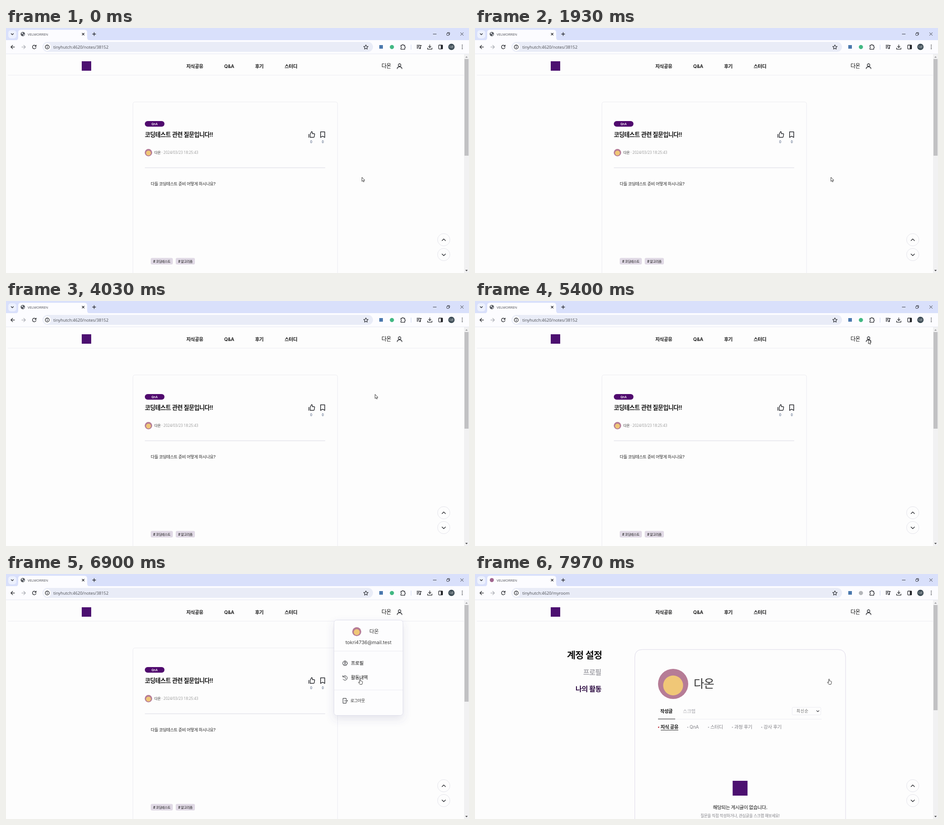
Recreate the animation shown at these times as an HTML page. Size 1027x545 px, loop 8000 ms.

```html
<!DOCTYPE html>
<html lang="ko">
<head>
<meta charset="utf-8">
<title>Board to activity page</title>
<style>
  html, body { margin: 0; width: 100%; height: 100%; overflow: hidden; background: #fdfdfd; }
  svg { display: block; width: 100vw; height: 100vh; }
  text { font-family: Inter, "Noto Sans CJK KR", "Noto Sans CJK", sans-serif; letter-spacing: -.04em; fill: #111; }
  .ui { font-family: "Open Sans", "Noto Sans", sans-serif; letter-spacing: 0; fill: #4a4c52; }
  .latin { letter-spacing: 0; }
  .mid { text-anchor: middle; }
  .medium { font-weight: 500; }
  .bold { font-weight: 600; }
  .gray { fill: #808086; }
  .pale { fill: #a8a8ae; }
  .line { fill: none; stroke: #24262b; stroke-width: 1.3; stroke-linejoin: round; stroke-linecap: round; }
  .edge { fill: none; stroke: #ebebf1; }
  .brand { fill: #4c1070; }
</style>
</head>
<body>
<svg viewBox="0 0 1027 545">
  <defs>
    <filter id="shadow" x="-30%" y="-30%" width="160%" height="160%">
      <feDropShadow dx="0" dy="8" stdDeviation="9" flood-color="#50508c" flood-opacity=".14"/>
    </filter>
    <g id="avatar">
      <circle r="10" fill="#b67c96"/>
      <circle r="6.6" cy="1" fill="#f0c777"/>
    </g>
    <g id="person" class="line">
      <circle cy="-2.6" r="2.9"/>
      <path d="M-5.3 5.6C-5 -.2 5 -.2 5.3 5.6"/>
    </g>
  </defs>

  <!-- Browser window -->
  <rect width="1027" height="545" fill="#fdfdfd"/>
  <rect width="1027" height="30" fill="#d9e0fb"/>
  <rect x="5" y="5" width="18" height="18" rx="6" fill="#edf1fe"/>
  <path class="line" d="M11.5 12.5l2.5 2.5 2.5-2.5"/>
  <path d="M20 28q7 0 7-7V10q0-6 6-6H174q6 0 6 6V21q0 7 7 7z" fill="#fcfcff"/>
  <rect y="27" width="1027" height="30.5" fill="#fcfcff"/>
  <path d="M0 57.5H1027" stroke="#e6e8f2"/>
  <g class="board">
    <circle cx="37.3" cy="13.5" r="4.8" fill="#55585e"/>
    <path d="M34 11l3-1 1 2-2 2zM38 15l3-2-.5 3-2 1z" fill="#e8eaf0"/>
  </g>
  <circle class="mypage" cx="37.3" cy="13.5" r="4.5" fill="#a0658f"/>
  <text class="ui" x="48" y="17.2" font-size="7.7">VELMORREN</text>
  <path class="line" d="M169 11.5l4.4 4.4m0-4.4l-4.4 4.4M192 13.5h7m-3.5-3.5v7"/>
  <g class="line" style="stroke-width:.9">
    <path d="M947.5 13.5h7M1008.3 10.3l6.2 6.2m0-6.2l-6.2 6.2M979.4 11.4v-1.3h4.6v4.6h-1.3"/>
    <rect x="977.7" y="11.5" width="5" height="5" rx="1"/>
  </g>

  <rect x="81" y="31" width="733" height="22" rx="11" fill="#e9ecf7"/>
  <circle cx="91.5" cy="42.3" r="8.5" fill="#fdfdff"/>
  <g class="line">
    <path d="M19 42.3h-8m3.7-3.8l-3.8 3.8 3.8 3.8"/>
    <path d="M35 42.3h8m-3.7-3.8l3.8 3.8-3.8 3.8" stroke="#a9abb2"/>
    <path d="M66.3 40.4a4 4 0 1 0 .3 3M66.8 38v2.8h-2.8"/>
    <circle cx="91.5" cy="42.3" r="4.3"/>
    <path d="M91.5 42v2.3m0-4.2v.1"/>
    <path d="M798.3 37.5l1.5 3.2 3.5.4-2.6 2.4.7 3.5-3.1-1.8-3.1 1.8.7-3.5-2.6-2.4 3.5-.4z" style="stroke-width:1.1"/>
    <path d="M876 38.5h2.6a1.6 1.6 0 0 1 3.2 0h2.7v3a1.6 1.6 0 0 1 0 3.1v2.8H876v-2.9a1.6 1.6 0 0 0 0-3z"/>
    <path d="M911.5 38.5h7m-7 3h5m-5 3h3M919.5 45v-6h2"/>
    <circle cx="918.2" cy="45" r="1.2"/>
    <path d="M940 37.5v6m-2.7-2.6l2.7 2.7 2.7-2.7M935.2 44.3v2.8h9.6v-2.8"/>
    <rect x="959.8" y="38" width="8.6" height="8.6" rx="1"/>
  </g>
  <rect x="964.5" y="38" width="4" height="8.6" fill="#24262b"/>
  <rect x="828" y="38" width="8" height="8" fill="#4a78ad"/>
  <circle id="extension" cx="856" cy="42.3" r="4.6"/>
  <path d="M898.5 37v11" stroke="#cdd5ee"/>
  <circle cx="988" cy="42" r="7" fill="#3b4a54"/>
  <text class="mid" x="988" y="44" font-size="5.5" style="fill:#fff">다온</text>
  <g fill="#24262b"><circle cx="1012" cy="38.3" r="1"/><circle cx="1012" cy="42.2" r="1"/><circle cx="1012" cy="46.1" r="1"/></g>
  <text id="address" class="ui" x="105" y="45.7" font-size="9.3"></text>

  <!-- Site header -->
  <rect class="brand" x="168" y="74" width="21" height="21"/>
  <g class="bold" font-size="10.6">
    <text x="400" y="88.7">지식공유</text>
    <text class="latin" x="484" y="88.7" font-size="10.3">Q&amp;A</text>
    <text x="552.5" y="88.7">후기</text>
    <text x="618" y="88.7">스터디</text>
  </g>
  <text class="medium" x="833" y="89" font-size="12">다온</text>
  <use href="#person" x="873" y="85"/>
  <path class="edge" d="M4 105H1016"/>

  <!-- Post -->
  <g class="board">
    <path class="edge" d="M281.5 545V169.5q0-5 5-5H730.5q5 0 5 5V545"/>
    <rect x="308" y="207" width="43.5" height="12.5" rx="6.2" fill="#500a6e"/>
    <text class="mid bold latin" x="329.5" y="215.5" font-size="6.5" style="fill:#fff">QnA</text>
    <text class="bold" x="308" y="242" font-size="13.1">코딩테스트 관련 질문입니다!!</text>
    <path class="line" style="stroke-width:1.9" transform="translate(669 228.3) scale(.75)"
      d="M7.5 11v9m0-9l4-8c1.6 0 2.5 1 2.5 2.5V9H19c1.3 0 2 1 1.8 2.2l-1.3 7A2 2 0 0 1 17.5 20h-10M3.5 11v9"/>
    <path class="line" style="stroke-width:1.5" d="M697.8 231h9.2v12.4l-4.6-2.7-4.6 2.7z"/>
    <text class="mid latin" x="677" y="256" font-size="7" style="fill:#233a63">0</text>
    <text class="mid latin" x="702.6" y="256" font-size="7" style="fill:#233a63">0</text>
    <use href="#avatar" transform="translate(316 277.3) scale(.82)"/>
    <text x="329" y="280.2" font-size="8" style="fill:#333">다온</text>
    <text class="ui" x="345" y="280.3" font-size="8.1" style="fill:#999">· 2024/03/23 18:25:43</text>
    <path d="M308 310.8H708" stroke="#e0dfe8" stroke-width="1.3"/>
    <text x="321" y="350.3" font-size="9.25" style="fill:#222">다들 코딩테스트 준비 어떻게 하시나요?</text>
    <g fill="#e0d9e5">
      <rect x="321" y="511.5" width="49" height="14.5" rx="3"/>
      <rect x="376.5" y="511.5" width="42.5" height="14.5" rx="3"/>
    </g>
    <g class="medium" font-size="7.3">
      <text x="326.5" y="521.5"># 코딩테스트</text>
      <text x="382" y="521.5"># 알고리즘</text>
    </g>
  </g>

  <!-- Activity page -->
  <g class="mypage">
    <g class="bold">
      <text x="204" y="188.3" font-size="20.8">계정 설정</text>
      <text class="pale" x="240" y="223.5" font-size="15.1">프로필</text>
      <text x="223" y="261" font-size="15.3" style="fill:#2d0b42">나의 활동</text>
    </g>
    <path d="M354.5 545V185q0-17 17-17H805q17 0 17 17V545" fill="none" stroke="#dcd8e8"/>
    <use href="#avatar" transform="translate(439.5 244.5) scale(3.35)"/>
    <text x="485" y="253" font-size="25.5" style="fill:#333">다온</text>
    <text class="bold" x="411" y="309.3" font-size="10.3">작성글</text>
    <text class="pale" x="461" y="309.3" font-size="10.5">스크랩</text>
    <path class="edge" d="M406 323H769"/>
    <path d="M406 322.5H444" stroke="#222" stroke-width="1.2"/>
    <rect class="edge" x="703.5" y="296.5" width="63.5" height="17" rx="2"/>
    <text x="713" y="308.3" font-size="9" style="fill:#666;letter-spacing:.08em">최신순</text>
    <path class="line" style="stroke-width:1.1" d="M757.8 303.8l2.6 2.6 2.6-2.6"/>
    <circle cx="407.3" cy="341" r="1.4" fill="#c22b3a"/>
    <g fill="#b5b5bb"><circle cx="472" cy="341" r="1.3"/><circle cx="518" cy="341" r="1.3"/><circle cx="571" cy="341" r="1.3"/><circle cx="636" cy="341" r="1.3"/></g>
    <path d="M412 347.3H451" stroke="#222"/>
    <g font-size="10.6">
      <text class="bold" x="411.5" y="344">지식 공유</text>
      <text class="gray latin" x="476" y="344" font-size="10">QnA</text>
      <text class="gray" x="522" y="344">스터디</text>
      <text class="gray" x="575" y="344">과정 후기</text>
      <text class="gray" x="640" y="344">강사 후기</text>
    </g>
    <rect class="brand" x="571.5" y="460" width="33" height="33"/>
    <text class="mid medium" x="588" y="523.2" font-size="10.7">해당되는 게시글이 없습니다.</text>
    <text class="mid gray" x="588" y="540.8" font-size="8.7">질문을 직접 작성하거나, 관심글을 스크랩 해보세요!</text>
  </g>

  <!-- Scroll controls -->
  <g fill="#fdfdfd" stroke="#e3e3ea"><circle cx="971" cy="471" r="13.7"/><circle cx="971" cy="504" r="13.7"/></g>
  <path class="line" d="M967.2 473l3.8-3.8 3.8 3.8M967.2 502.7l3.8 3.8 3.8-3.8"/>
  <rect x="1016" y="58" width="11" height="487" fill="#f1f1f2"/>
  <rect id="thumb" x="1017" y="69" width="9" fill="#c1c1c3"/>
  <path d="M1018.8 66l2.7-3.2 2.7 3.2z" fill="#a0a0a2"/>
  <path d="M1018.8 538l2.7 3.2 2.7-3.2z" fill="#505052"/>

  <!-- Account menu -->
  <g id="menu">
    <rect x="727.5" y="102.5" width="153" height="212" rx="6" fill="#fdfdfe" stroke="#dedeea" filter="url(#shadow)"/>
    <use href="#avatar" x="778" y="128.3"/>
    <text x="806" y="132.3" font-size="11.6" style="fill:#333">다온</text>
    <text class="mid latin" x="804" y="156.3" font-size="10.8" style="fill:#444">tokri4736@mail.test</text>
    <path class="edge" d="M728 171.5H880M728 258H880"/>
    <g class="line" style="stroke-width:1">
      <circle cx="752" cy="198.5" r="5.2"/><circle cx="752" cy="197" r="1.9"/>
      <path d="M748.6 202.3q3.4-3.4 6.8 0"/>
      <path d="M747.6 228.7a5 5 0 1 1 0 5.2M747 226v3h3M752 228.5v3l2.2 1.3"/>
      <path d="M754.5 279.5v-3h-7v11h7v-3M751 282h6.5m-2-2l2 2-2 2"/>
    </g>
    <text class="medium" x="765" y="202" font-size="10.6">프로필</text>
    <text class="medium" x="765" y="234.2" font-size="10.6">활동내역</text>
    <text x="764" y="284.7" font-size="9.1" style="fill:#333">로그아웃</text>
  </g>

  <g id="pointer" fill="#fff" stroke="#222" stroke-width=".9" stroke-linejoin="round">
    <path id="arrow" d="M0 0V9.2L2.1 7.3 3.5 10.4 5 9.7 3.7 6.7H6.4z"/>
    <path id="hand" d="M-1 6V1a.9.9 0 0 1 1.8 0V4.2l3.6.9q1.2.4 1 1.8l-.5 3-.8 2.1H-.4L-3.6 8q-.5-1.2.8-1.3L-1 8z"/>
  </g>
</svg>

<script>
  const LOOP = 8000, MENU_OPENS = 5620, PAGE_CHANGES = 7650;
  const byId = id => document.getElementById(id);
  const show = (el, on) => { el.style.display = on ? '' : 'none'; };
  const ease = (t, start, end) => {
    const k = Math.min(1, Math.max(0, (t - start) / (end - start)));
    return k * k * (3 - 2 * k);
  };
  // Quadratic curve through a start, a control value and an end.
  const curve = (k, a, b, c) => (1 - k) ** 2 * a + 2 * k * (1 - k) * b + k * k * c;

  function pointerAt(t) {
    const up = ease(t, 3500, 4560), down = ease(t, 5900, 6650);
    return down > 0
      ? [curve(down, 872.5, 835, 785.5), curve(down, 86, 150, 233.5)]
      : [curve(up, 789.5, 806, 872.5), curve(up, 332, 207, 86)];
  }

  function draw(t) {
    const onMyPage = t >= PAGE_CHANGES;
    const [x, y] = pointerAt(t);
    const overItem = t >= MENU_OPENS && y > 186;
    document.querySelectorAll('.board').forEach(el => show(el, !onMyPage));
    document.querySelectorAll('.mypage').forEach(el => show(el, onMyPage));
    show(byId('menu'), t >= MENU_OPENS && !onMyPage);
    show(byId('arrow'), !overItem);
    show(byId('hand'), overItem);
    byId('address').textContent = 'tinyhutch:4620/' + (onMyPage ? 'myroom' : 'notes/38152');
    byId('extension').setAttribute('fill', onMyPage ? '#b4b6ba' : '#41b883');
    byId('thumb').setAttribute('height', onMyPage ? 234 : 215);
    byId('pointer').setAttribute('transform', `translate(${x} ${y})`);
  }

  const began = performance.now();
  function frame() {
    draw((performance.now() - began) % LOOP);
    requestAnimationFrame(frame);
  }
  frame();
</script>
</body>
</html>
```
